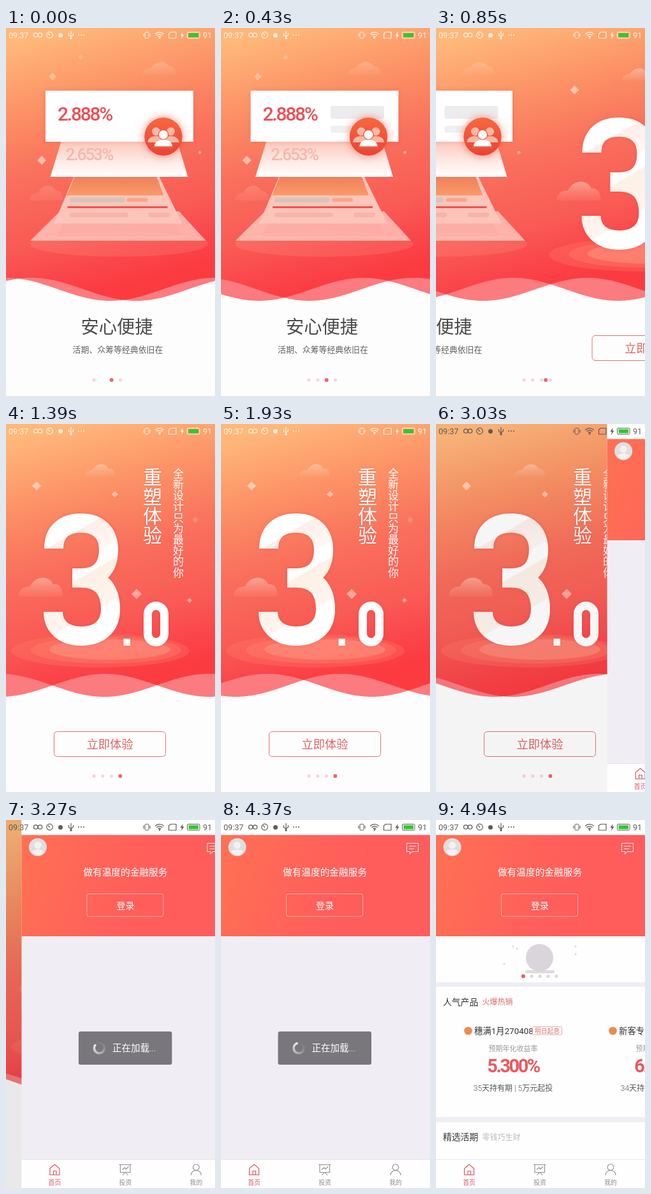
An HTML page with a canvas for the animation above (5040 ms loop, 328 px wide and 576 px high).

```html
<!DOCTYPE html>
<html lang="zh-CN">
<head>
<meta charset="utf-8">
<title>App welcome</title>
<style>
html, body { margin: 0; width: 100%; height: 100%; overflow: hidden; background: #fff; }
canvas { display: block; width: 328px; height: 576px; }
</style>
</head>
<body>
<canvas id="stage"></canvas>
<script>
const W = 328, H = 576, LOOP = 5040;
const canvas = document.getElementById('stage');
const ratio = window.devicePixelRatio || 1;
canvas.width = W * ratio;
canvas.height = H * ratio;
const c = canvas.getContext('2d');
const FONT = 'Roboto, "Noto Sans CJK SC", "Noto Sans CJK", sans-serif';

// The screen refreshes in uneven steps.
const TICKS = [0, 150, 280, 430, 580, 700, 850, 970, 1120, 1270, 1390, 1540, 1660, 1810, 1930,
  2080, 2230, 2350, 2480, 2630, 2750, 2880, 3030, 3150, 3270, 3400, 3540, 3700, 3820, 3940,
  4090, 4220, 4370, 4520, 4640, 4790, 4940];
const SCROLL = [[0, 15.5], [150, 6], [280, 2], [430, 0], [700, 0], [850, -158.5],
  [970, -258], [1120, -311], [1270, -326], [1390, -328]];
const TAP = 2880, SLIDE_START = 3000, SLIDE_TIME = 466, LOADED = 4940;

function track(keys, t) {
  if (t <= keys[0][0]) return keys[0][1];
  for (let i = 1; i < keys.length; i++) {
    const [t0, v0] = keys[i - 1], [t1, v1] = keys[i];
    if (t <= t1) return v0 + (v1 - v0) * (t - t0) / (t1 - t0);
  }
  return keys[keys.length - 1][1];
}

function at(x, y, draw) {
  c.save();
  c.translate(x, y);
  draw();
  c.restore();
}

function shaded(color, blur, draw) {
  c.save();
  c.shadowColor = color;
  c.shadowBlur = blur * ratio;
  draw();
  c.restore();
}

function rect(x, y, w, h, fill) {
  c.fillStyle = fill;
  c.fillRect(x, y, w, h);
}

function paint(fill, stroke, width = 1) {
  if (fill) { c.fillStyle = fill; c.fill(); }
  if (stroke) { c.strokeStyle = stroke; c.lineWidth = width; c.stroke(); }
}

function box(x, y, w, h, r, fill, stroke) {
  c.beginPath();
  c.roundRect(x, y, w, h, r);
  paint(fill, stroke);
}

function oval(x, y, rx, ry, fill, stroke, width) {
  c.beginPath();
  c.ellipse(x, y, rx, ry, 0, 0, 2 * Math.PI);
  paint(fill, stroke, width);
}

const disc = (x, y, r, fill, stroke, width) => oval(x, y, r, r, fill, stroke, width);

function poly(points, fill) {
  c.beginPath();
  points.forEach(([x, y]) => c.lineTo(x, y));
  c.closePath();
  paint(fill);
}

function path(d, stroke, width = 1, fill) {
  const p = new Path2D(d);
  if (fill) { c.fillStyle = fill; c.fill(p); }
  if (stroke) { c.strokeStyle = stroke; c.lineWidth = width; c.stroke(p); }
}

function gradient(x0, y0, x1, y1, ...stops) {
  const g = c.createLinearGradient(x0, y0, x1, y1);
  stops.forEach(([p, color]) => g.addColorStop(p, color));
  return g;
}

// y is the middle of the glyphs
function text(s, x, y, size, color, { align = 'center', weight = 400, spacing = 0 } = {}) {
  c.font = `${weight} ${size}px ${FONT}`;
  c.letterSpacing = spacing + 'px';
  c.textAlign = align;
  c.fillStyle = color;
  c.fillText(s, x, y + size * 0.365);
}

function diamond(x, y, r, fill) {
  poly([[x, y - r], [x + r, y], [x, y + r], [x - r, y]], fill);
}

const spark = (x, y, r, alpha) => diamond(x, y, r, `rgba(255,235,225,${alpha})`);

function cloud(x, y, w, h, alpha) {
  c.beginPath();
  c.moveTo(x, y + h);
  c.bezierCurveTo(x, y + h * 0.6, x + w * 0.12, y + h * 0.45, x + w * 0.25, y + h * 0.45);
  c.bezierCurveTo(x + w * 0.4, y - h * 0.25, x + w * 0.7, y - h * 0.15, x + w * 0.78, y + h * 0.3);
  c.bezierCurveTo(x + w * 0.95, y + h * 0.3, x + w, y + h * 0.6, x + w, y + h);
  c.closePath();
  paint(gradient(0, y, 0, y + h, [0, `rgba(255,225,210,${alpha})`], [1, 'rgba(255,190,170,0.1)']));
}

function person(x, y, s, color) {
  disc(x, y, s * 0.5, color);
  c.beginPath();
  c.moveTo(x - s, y + s * 1.3);
  c.bezierCurveTo(x - s, y + s * 0.3, x + s, y + s * 0.3, x + s, y + s * 1.3);
  c.closePath();
  paint(color);
}

function backdrop() {
  rect(0, 0, W, H, '#fefdfe');
  rect(0, 0, W, 430, gradient(100, 0, 205, 400, [0, '#ffb87a'], [0.25, '#fc9366'],
    [0.5, '#f9705c'], [0.75, '#f95b55'], [0.9, '#fa454a'], [1, '#fb3b40']));
}

// Two sine waves drift left at different speeds.
function waves(t) {
  const crestA = -0.243 * t, crestB = 40 - 0.153 * t;
  const height = (x, crest) => 409 - 18 * Math.cos(2 * Math.PI * (x - crest) / W);
  const below = (pick, fill) => {
    c.beginPath();
    c.moveTo(0, H);
    for (let x = 0; x <= W; x += 2) c.lineTo(x, pick(height(x, crestA), height(x, crestB)));
    c.lineTo(W, H);
    c.closePath();
    paint(fill);
  };
  below(Math.min, '#fb7b7f');
  below(Math.max, '#fefdfe');
}

function cardsArt(t) {
  cloud(199, 54, 52, 19, 0.3);
  cloud(22, 248, 52, 22, 0.18);
  spark(40.5, 207, 7, 0.6);
  spark(57.5, 76, 6, 0.4);
  spark(101.5, 46, 4, 0.3);
  spark(288.5, 195, 3, 0.5);
  oval(162, 338, 140, 20, 'rgba(255,170,150,0.18)');

  poly([[69, 287], [256, 287], [298.5, 333], [22.5, 333]], 'rgba(255,208,198,0.75)');
  poly([[75, 305], [248, 305], [259, 326], [64, 326]], 'rgba(250,165,155,0.4)');
  poly([[91, 233], [225, 233], [261, 306], [60, 306]], '#fbc5ba');
  poly([[92, 233], [221, 233], [232, 262], [80, 262]],
    gradient(0, 233, 0, 262, [0, '#ee805c'], [1, '#fa9a68']));
  box(84, 265, 87, 8, 4, '#d9c4ba');
  box(174, 266, 33, 6, 3, '#f7a58f');
  rect(81, 279, 157, 3, '#f0544e');
  box(84, 289, 92, 7, 3, '#f8b4aa');
  box(208, 289, 34, 7, 3, '#f8b4aa');

  poly([[71, 178], [253.5, 178], [270, 233], [54, 233]],
    gradient(0, 178, 0, 233, [0, '#fbc9bd'], [0.55, '#fee9e4'], [1, '#fff']));
  text('2.653%', 115, 198, 26, '#f6b6ae', { weight: 500, spacing: -2 });

  shaded('rgba(220,60,40,0.25)', 8, () => rect(46.5, 98, 232, 80, '#fff'));
  text('2.888%', 108, 134, 30, '#ea5058', { weight: 500, spacing: -2.3 });
  if (t >= 150) {
    box(172, 122, 84, 20, 3, '#ececef');
    box(172, 153, 40, 11, 3, '#f0eff1');
  }

  shaded('rgba(235,80,55,0.7)', 14, () => disc(231.5, 170, 29.5, '#ea4c38'));
  disc(231.5, 170, 29.5, gradient(0, 140, 0, 200, [0, '#f7683f'], [1, '#ea4335']));
  person(220, 162, 13, '#f9b8a6');
  person(243, 162, 13, '#f9b8a6');
  person(231.5, 167, 16.5, '#ee5a3b');
  person(231.5, 167, 14, '#fff');
}

function cardsText() {
  text('安心便捷', 158.5, 468, 28.3, '#4a4a4a');
  text('活期、众筹等经典依旧在', 160, 503, 12.9, '#606060', { weight: 300 });
}

function versionArt() {
  cloud(123, 64, 48, 18, 0.45);
  cloud(20, 242, 69, 28, 0.45);
  spark(48, 97, 7, 0.6);
  spark(171, 110, 5, 0.55);
  spark(205, 266, 8, 0.5);
  spark(288, 276, 4, 0.5);
  spark(297, 150, 5, 0.2);
  oval(148, 355, 140, 26, 'rgba(255,130,110,0.28)');
  oval(157, 354, 118, 21, 'rgba(255,140,115,0.3)');
  oval(163, 353, 95, 16, 'rgba(255,165,140,0.4)');

  const shine = gradient(70, 150, 180, 340, [0, '#fff'], [0.16, '#fff'], [0.17, '#feeeea'], [0.36, '#fff7f3'],
    [0.37, '#fff'], [0.46, '#fff'], [0.47, '#fdf0e6'], [0.72, '#fef5ee'], [0.73, '#fff'], [1, '#fff']);
  shaded('rgba(210,50,40,0.25)', 6, () => {
    path('M75 195C75 168 92 155 118 155C146 155 161 172 161 197C161 226 145 241 118 241H104' +
      'H118C148 241 164 258 164 290C164 318 145 332 118 332C92 332 74 318 74 294', shine, 30);
    rect(184.5, 336, 10.5, 11, '#fff');
    path('M222.500 297.500A13 13 0 0 1 248.500 297.500V328.500A13 13 0 0 1 222.500 328.500Z', '#fff', 13);
  });
  shaded('rgba(210,50,40,0.3)', 3, () =>
    [...'重塑体验'].forEach((ch, i) => text(ch, 230, 83.5 + 30.2 * i, 30, '#fff')));
  [...'全新设计只为最好的你'].forEach((ch, i) =>
    text(ch, 270.5, 77.5 + 17.2 * i, 17, '#fff', { weight: 300 }));
}

function versionButton() {
  box(75.5, 481.5, 175, 39, 5, null, '#dd7571');
  text('立即体验', 163, 501, 18.3, '#dc6661', { weight: 300 });
}

function pageDots(t, scroll) {
  for (let i = 0; i < 4; i++) {
    if (i === 1 && t < 150) continue;
    disc(138 + 13.8 * i, 551, 2.6, '#fad3da');
  }
  disc(138 + 13.8 * Math.max(2, 2 - scroll / W), 551, 3, '#ee6666');
}

function welcome(t) {
  const scroll = track(SCROLL, t);
  backdrop();
  at(scroll, 0, () => cardsArt(t));
  at(scroll + W, 0, versionArt);
  waves(Math.min(t, TAP));
  at(scroll, 0, cardsText);
  at(scroll + W, 0, versionButton);
  pageDots(t, scroll);
}

function header() {
  rect(0, 0, W, 23.5, '#fff');
  rect(0, 23.5, W, 158.5, gradient(0, 60, 220, 130, [0, '#ff7054'], [0.6, '#ff6259'], [1, '#ff5c5c']));
  disc(25.5, 42.5, 14, '#dfdee0');
  c.save();
  c.beginPath();
  c.arc(25.5, 42.5, 12.5, 0, 7);
  c.clip();
  disc(25.5, 39.5, 5.5, '#f3f2f3');
  oval(25.5, 54, 11, 8, '#f3f2f3');
  c.restore();
  path('M291.500 36.500H309.500V49.500H300L296.500 53V49.500H291.500ZM295 41H306M295 45H303', '#ffe9e6', 1.1);
  text('做有温度的金融服务', 163, 82, 14.7, '#fff', { weight: 300 });
  box(102.5, 115.5, 120, 35.5, 3, null, 'rgba(255,225,220,0.65)');
  text('登录', 163, 133.5, 14, '#fff', { weight: 300 });
}

function tabs() {
  rect(0, 531, W, 45, '#fefefe');
  rect(0, 531, W, 1, '#e6e5e9');
  const red = '#dd5560', gray = '#8d8d8f';
  path('M44.500 545.500L52 539L59.500 545.500V555.500H44.500ZM50 555.500V549.500H54.500V555.500', red, 1.2);
  path('M153 539.500H172.500M155 539.500V551.500H170.500V539.500M158 547.500L161.500 544L164 546.500L168 542.500' +
    'M162.500 551.500L158.500 556M163 551.500L167 556', gray, 1.1);
  disc(274, 543.5, 4.8, null, gray, 1.1);
  path('M266 556C266 546 282 546 282 556', gray, 1.1);
  text('首页', 52, 567, 9.8, red);
  text('投资', 163, 567, 9.8, gray);
  text('我的', 274, 567, 9.8, gray);
}

function loader(t) {
  box(89.5, 331, 146.5, 52, 3, '#7a777c');
  const sweep = c.createConicGradient(t / 1000 * 2 * Math.PI + 2.2, 122, 357);
  sweep.addColorStop(0, 'rgba(255,255,255,0)');
  sweep.addColorStop(0.3, 'rgba(255,255,255,0.1)');
  sweep.addColorStop(1, 'rgba(255,255,255,0.85)');
  disc(122, 357, 8, null, sweep, 3.5);
  text('正在加载...', 142.5, 357, 14.5, '#fff', { align: 'left', weight: 300 });
}

function product(x, nameX, name, rate, terms) {
  disc(nameX - 9.5, 330, 6.3, '#ee8b4f');
  text(name, nameX, 330, 13.4, '#333', { align: 'left' });
  text('预期年化收益率', x, 358, 11, '#999');
  text(rate, x, 384, 29, '#ea5a5f', { weight: 600, spacing: -2.5 });
  text(terms, x, 419.5, 12, '#555', { weight: 300 });
}

function feed() {
  const left = { align: 'left' };
  rect(0, 182, W, 72, '#fefefe');
  rect(0, 261, W, 204, '#fefefe');
  rect(0, 473, W, 58, '#fefefe');

  box(140, 235, 46, 5, 2, '#dedce0');
  disc(162.5, 215.5, 21.5, '#d9d5da');
  [[121, 198], [127, 201.5], [219, 198], [219, 210], [107, 225]].forEach(([x, y]) => diamond(x, y, 2, '#dddbe2'));
  for (let i = 0; i < 5; i++) disc(137 + 13 * i, 244.5, i ? 2.6 : 3, i ? '#d9d9db' : '#ea5a5f');

  text('人气产品', 11, 285, 13.8, '#333', left);
  text('火爆热销', 72.5, 285, 12, '#e06a68', left);
  product(121, 60, '穗满1月270408', '5.300%', '35天持有期 | 5万元起投');
  box(151.5, 323.5, 46, 12.5, 1, null, '#eda9a9');
  text('明日起息', 174.5, 330, 9.8, '#e06a6a');
  product(352, 287, '新客专享1月270409', '6.000%', '34天持有期 | 5万元起投');
  text('精选活期', 11, 496, 13.8, '#333', left);
  text('零钱巧生财', 72.5, 497, 12, '#bbb', { align: 'left', weight: 300 });
}

function home(t) {
  rect(0, 0, W, H, '#f0eef4');
  header();
  if (t >= LOADED) feed(); else loader(t);
  tabs();
}

function statusBar(dark) {
  const ink = dark ? '#5c5c5e' : '#fff3e6';
  text('09:37', 4, 11.5, 12.6, ink, { align: 'left' });
  disc(46.7, 11, 3.2, null, ink, 1.3);
  disc(53.5, 11, 3.2, null, ink, 1.3);
  disc(68.5, 11, 4.8, null, ink, 1.2);
  path('M66 8.500L69 11.500', ink, 1.2);
  disc(85.5, 11.5, 3.5, ink);
  path('M102 5V17M98.500 8V11.500L102 14L105.500 11V8', ink, 1.2);
  disc(102, 16, 1.7, ink);
  [114, 118, 122].forEach(x => disc(x, 11, 1, ink));
  box(218, 6.5, 6, 9.5, 1.5, null, ink);
  path('M216 9V13.500M226 9V13.500', ink, 1.1);
  for (let r = 3; r < 11; r += 3.2) {
    c.beginPath();
    c.arc(241, 16, r, -Math.PI * 0.76, -Math.PI * 0.24);
    paint(null, ink, 1.3);
  }
  disc(241, 15.5, 1.3, ink);
  path('M255.500 9L258.500 6.500H267V16H255.500Z', ink, 1.2);
  path('M277.500 6L273.500 12H276L275 17L279.500 10.500H276.800Z', null, 1, ink);
  box(284.5, 6.5, 19.5, 9.5, 1.5, null, ink);
  rect(286.5, 8.2, 15.5, 6.2, '#2fc92d');
  text('91', 309, 11.5, 12.6, ink, { align: 'left' });
}

function draw(now) {
  const time = now % LOOP;
  const t = TICKS.findLast(tick => tick <= time) ?? 0;
  c.setTransform(ratio, 0, 0, ratio, 0, 0);
  const p = Math.min(1, Math.max(0, (t - SLIDE_START) / SLIDE_TIME));
  if (p < 1) welcome(t);
  if (p > 0) {
    rect(0, 0, W, H, `rgba(0,0,0,${0.1 * p ** 0.4})`);
    at(W * (1 - p) ** 3, 0, () => home(t));
  }
  statusBar(p > 0);
}

const start = performance.now();
function loop() {
  draw(performance.now() - start);
  requestAnimationFrame(loop);
}
loop();
</script>
</body>
</html>
```
